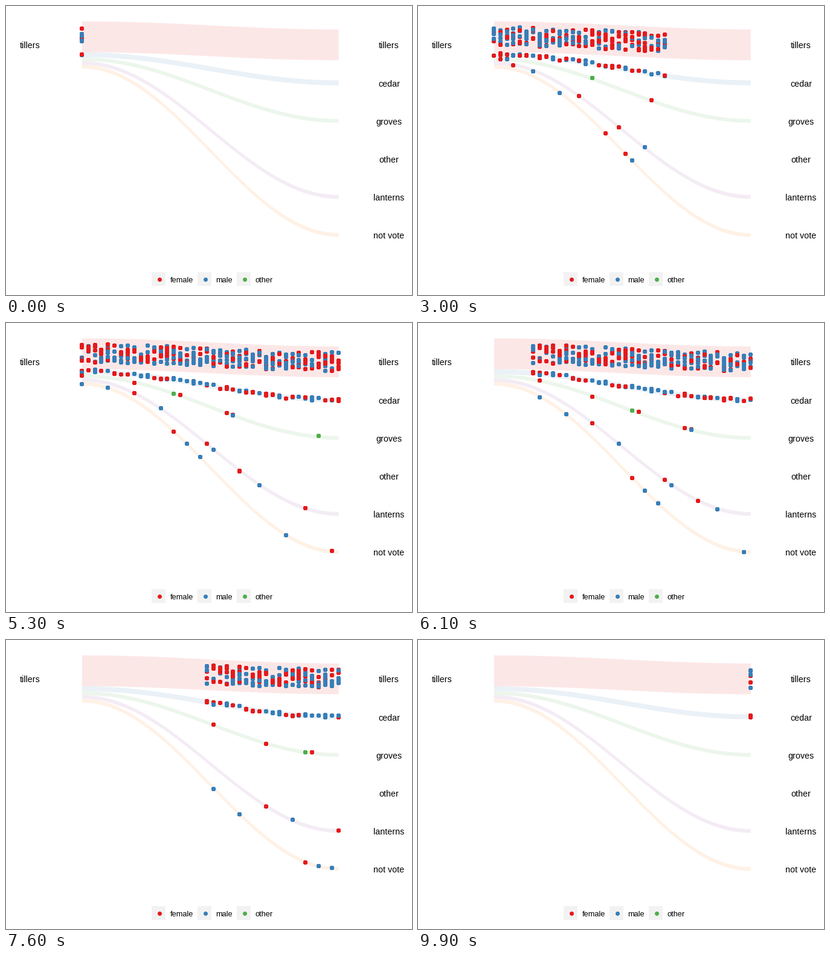
Animation, 672 px wide and 480 px high, one loop 10000 ms. Source, as a matplotlib script:

```python
import numpy as np
import matplotlib.pyplot as plt
from matplotlib.animation import FuncAnimation
from matplotlib.patches import Rectangle

plt.rcParams["font.family"] = "Liberation Sans"

W, H, DPI = 672, 480, 96
FRAMES, STEPS, COLS = 100, 87, 39
GROUPS = STEPS - COLS + 1
X0, X1 = 125.3, 550.3
TOP, ROW = 64.0, 63.15
RED, BLUE, GREEN, PURPLE, ORANGE = "#e41a1c", "#377eb8", "#4daf4a", "#984ea3", "#ff7f00"
FEMALE, MALE, OTHER = RED, BLUE, GREEN

LABELS = ["tillers", "cedar", "groves", "other", "lanterns", "not vote"]
# row on the right, band height, colour
BANDS = [(0, 51.2, RED), (1, 8.3, BLUE), (2, 6.3, GREEN),
         (4, 6.3, PURPLE), (5, 6.4, ORANGE)]


def ease(u):
    return (1 - np.cos(np.pi * u)) / 2


def snap(v):
    """Centre of the pixel that holds v."""
    return np.floor(v) + 0.5


def label(x, y, text, size=10.7, ha="center"):
    ax.text(x, y, text, fontsize=size, ha=ha, va="baseline", color="black")


def draw_dots(x, y, color):
    return ax.scatter(x, y, s=(7 * 72 / DPI) ** 2, c=color, linewidths=0,
                      antialiased=False, zorder=3)


fig = plt.figure(figsize=(W / DPI, H / DPI), dpi=DPI, facecolor="white")
ax = fig.add_axes([0, 0, 1, 1])
ax.set_xlim(0, W)
ax.set_ylim(H, 0)
ax.axis("off")

# Bands: stacked on the left, one per row on the right
u = np.linspace(0, 1, 200)
ends = {}
edge = 25.0
for row, height, color in BANDS:
    left, right = edge + height / 2, TOP + ROW * row
    ends[row] = left, right
    mid = left + (right - left) * ease(u)
    ax.fill_between(X0 + (X1 - X0) * u, mid - height / 2, mid + height / 2,
                    color=color, alpha=0.1, linewidth=0, antialiased=False)
    edge += height

label(40, TOP + 6.5, LABELS[0])
for row, name in enumerate(LABELS):
    label(634, TOP + ROW * row + 6.5, name)

# Legend
for x, name, color in [(241, "female", FEMALE), (317, "male", MALE),
                       (382, "other", OTHER)]:
    ax.add_patch(Rectangle((x, 442), 23, 23, facecolor="#f2f2f2", linewidth=0))
    draw_dots([x + 12.5], [453.5], color)
    label(x + 30.5, 459, name, 9.6, "left")

# Voters set off in groups; each keeps its own offset from the band's middle
rng = np.random.default_rng(14)
voters = []


def add(row, start, spread, color=None):
    left, right = ends[row]
    d = rng.uniform(-spread, spread)
    color = color or rng.choice([FEMALE, MALE])
    voters.append((start, left + d, right + d, color))


for start in range(GROUPS):
    for _ in range(rng.integers(8, 11)):
        add(0, start, 15.5)
    for _ in range(rng.integers(1, 3)):
        add(1, start, 2.8)

# Sparse streams: departures of women, men and others
SPARSE = {
    2: ([2, 24, 25, 32, 39, 47], [24], [11, 33]),
    4: ([7, 13, 23, 23, 28, 39], [3, 20, 27, 35], []),
    5: ([6, 9, 33, 43], [5, 16, 29, 31, 43, 47], []),
}
for row, departures in SPARSE.items():
    for color, group in zip((FEMALE, MALE, OTHER), departures):
        for start in group:
            add(row, start, 1.5, color)

starts, lefts, rights, colors = map(np.array, zip(*voters))
dots = draw_dots([], [], None)


def update(i):
    col = round(i * STEPS / (FRAMES - 1)) - starts
    live = (col >= 0) & (col <= COLS)
    k = col[live] / COLS
    x = X0 + (X1 - X0) * k
    y = lefts[live] + (rights - lefts)[live] * ease(k)
    dots.set_offsets(np.column_stack([snap(x), snap(y)]))
    dots.set_facecolors(list(colors[live]))
    return (dots,)


anim = FuncAnimation(fig, update, frames=FRAMES, interval=100,
                     repeat=True, repeat_delay=0, blit=False)
plt.show()
```
